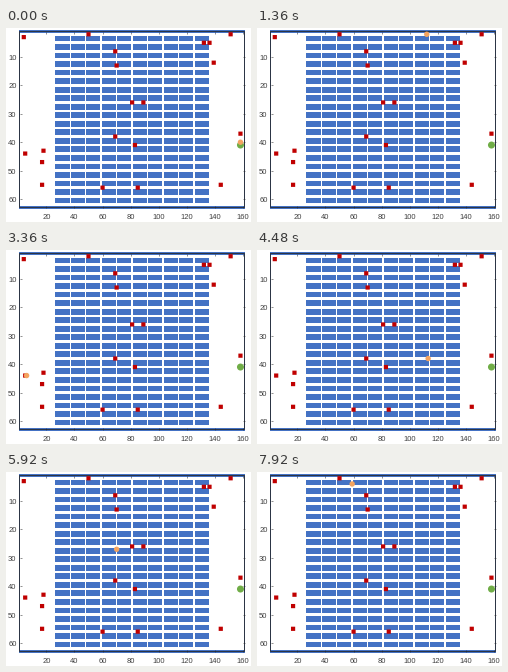
Animation of 245 by 194 pixels, one loop 8000 ms. Source, as a matplotlib script:

```python
import numpy as np
import matplotlib.pyplot as plt
from matplotlib.animation import FuncAnimation
from matplotlib.patches import Circle, Rectangle

W, H, DPI = 245, 194, 100
PT = 72 / DPI
FRAMES, INTERVAL, SPEED = 100, 80, 10
BLUE, RED, GREEN, ORANGE = "#4472c4", "#c00000", "#70ad47", "#f4a460"
INK = "#262626"

COLUMNS, SHELVES = 10, 20
AISLE_X, AISLE_Y = 11, 3  # spacing of the aisles in cells

DEPOT = (158, 41)
ITEMS = [(4, 3), (50, 2), (69, 8), (70, 13), (132, 5), (136, 5), (139, 12),
         (151, 2), (81, 26), (89, 26), (158, 37), (5, 44), (18, 43), (17, 47),
         (17, 55), (69, 38), (83, 41), (60, 56), (85, 56), (144, 55)]

# Where the picker turns; between stops it walks along a row, then a column.
STOPS = [(158, 40), (158, 38), (81, 8), (69, 2), (151, 2), (147, 41),
         (70, 56), (16, 44), (4.5, 44), (16, 56), (103, 38), (147, 2),
         (151, 2), (136, 5), (92, 26), (70, 38), (16, 56), (16, 44),
         (6, 56), (59, 2), (48.5, 2), (59, 4)]


def px(x):
    return 12.16 + 1.407 * x


def py(y):
    return 0.6 + 2.84 * y


def walk(stops):
    corners = stops[:1]
    for x, y in stops[1:]:
        corners += [(x, corners[-1][1]), (x, y)]
    corners = np.array(corners, float)
    steps = np.abs(np.diff(corners, axis=0)).sum(axis=1)
    return corners, np.concatenate(([0], np.cumsum(steps)))


route, travelled = walk(STOPS)

fig = plt.figure(figsize=(W / DPI, H / DPI), dpi=DPI, facecolor="white")
ax = fig.add_axes([0, 0, 1, 1])
ax.set_xlim(0, W)
ax.set_ylim(H, 0)
ax.axis("off")


def cells(x0, y0, x1, y1, color):
    ax.add_patch(Rectangle((px(x0), py(y0)), px(x1) - px(x0),
                           py(y1) - py(y0), fc=color, lw=0))


def square(x, y, size=4.2):
    ax.add_patch(Rectangle((px(x) - size / 2, py(y) - size / 2), size, size,
                           fc=RED, lw=0, snap=False, zorder=3))


def disc(x, y, radius, color):
    return ax.add_patch(Circle((px(x), py(y)), radius, fc=color, lw=0,
                               zorder=4))


def tick(xs, ys):
    ax.plot(xs, ys, color=INK, lw=0.5 * PT, solid_capstyle="butt")


# Outer wall, one cell thick, and the shelf blocks
cells(0.5, 0.5, 161.5, 63.5, BLUE)
cells(1.5, 1.5, 160.5, 62.5, "white")
for x in 26.5 + AISLE_X * np.arange(COLUMNS):
    for y in 2.5 + AISLE_Y * np.arange(SHELVES):
        cells(x, y, x + AISLE_X - 1, y + AISLE_Y - 1, BLUE)

left, right, top, bottom = 13.5, 238.5, 3.5, 179.5
ax.add_patch(Rectangle((left, top), right - left, bottom - top, fill=False,
                       ec=INK, lw=0.8 * PT, snap=False))

label = dict(family="Liberation Sans", size=7.6 * PT, color="#404040")
for x in range(20, 161, 20):
    for edge, inward in ((bottom, -2), (top, 2)):
        tick([px(x)] * 2, [edge, edge + inward])
    ax.text(px(x), 191, str(x), ha="center", va="baseline", **label)
for y in range(10, 61, 10):
    for edge, inward in ((left, 2), (right, -2)):
        tick([edge, edge + inward], [py(y)] * 2)
    ax.text(10.5, py(y) + 3, str(y), ha="right", va="baseline", **label)

for item in ITEMS:
    square(*item)
disc(*DEPOT, 3.5, GREEN)
picker = disc(*STOPS[0], 2.7, ORANGE)


def update(frame):
    x, y = (np.interp(frame * SPEED, travelled, axis) for axis in route.T)
    picker.center = px(x), py(y)
    return picker,


anim = FuncAnimation(fig, update, frames=FRAMES, interval=INTERVAL,
                     repeat=True, repeat_delay=0)
plt.show()
```
